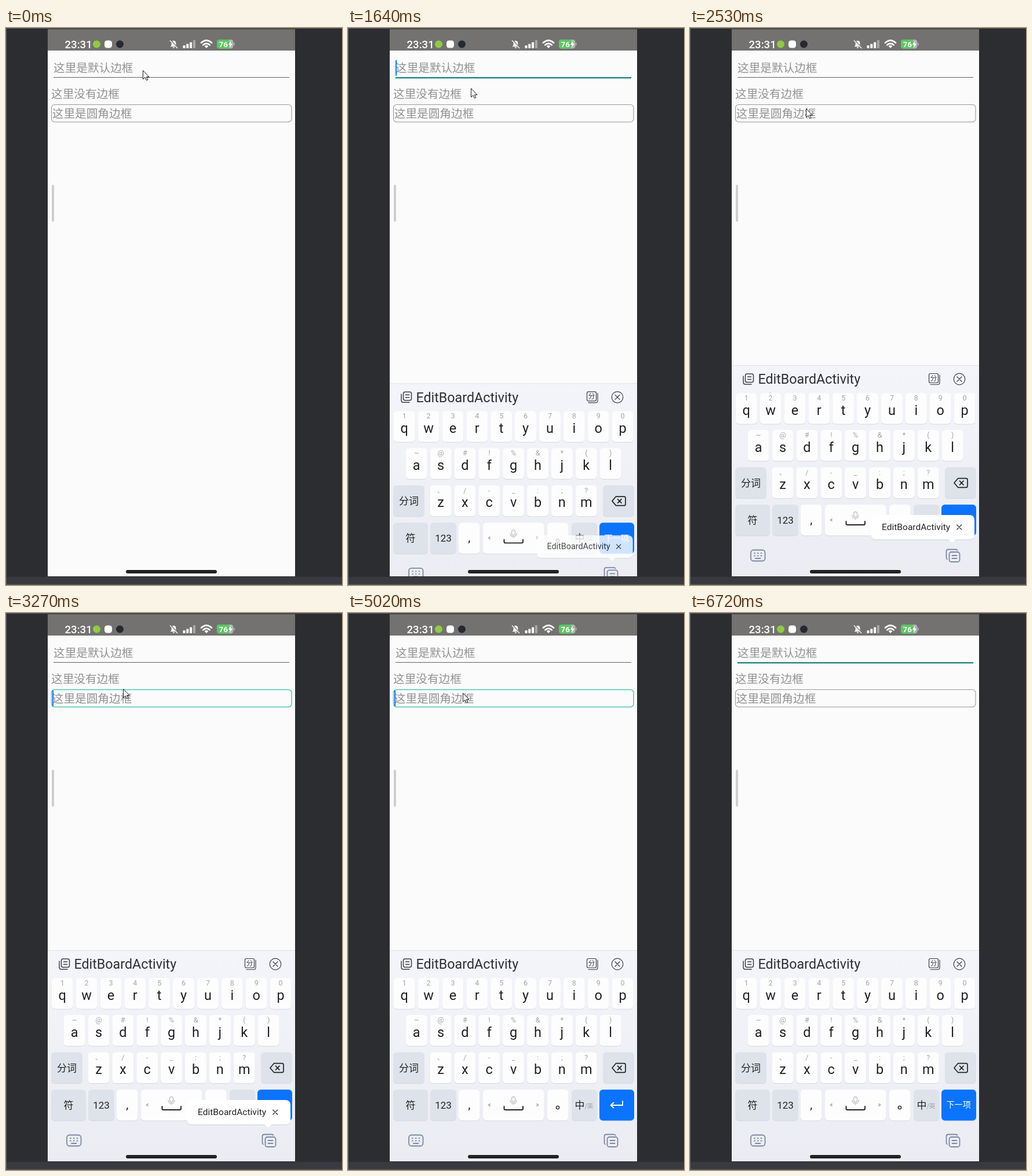
An HTML page for the animation above (6.74 s loop, 580 px wide and 963 px high).

```html
<!DOCTYPE html>
<html lang="zh-CN">
<head>
<meta charset="utf-8">
<title>Edit field borders</title>
<style>
html, body { margin: 0; width: 100%; height: 100%; overflow: hidden; background: #2c2d31; }
svg { display: block; width: 100%; height: 100%; }
text { font-family: Roboto, "Noto Sans CJK SC", "Noto Sans CJK", sans-serif; }
.zh { font-family: "Noto Sans CJK SC", "Noto Sans CJK", "Noto Sans CJK JP", sans-serif; }
.mid { text-anchor: middle; }
.line { fill: none; stroke-linecap: round; stroke-linejoin: round; }
</style>
</head>
<body>
<svg viewBox="0 0 580 963" preserveAspectRatio="none">
  <defs>
    <linearGradient id="board" x1="0" y1="0" x2="0" y2="1">
      <stop offset="0" stop-color="#f3f5fa"/>
      <stop offset="1" stop-color="#eaecf2"/>
    </linearGradient>
    <clipPath id="screen"><rect x="72" y="2" width="427" height="946"/></clipPath>
  </defs>

  <rect width="580" height="963" fill="#2c2d31"/>
  <rect y="949" width="580" height="13" fill="#393a3f"/>
  <rect y="961.5" width="580" height="1.5" fill="#56575a"/>
  <rect width="580" height="1" fill="#606163"/>
  <rect width="1" height="963" fill="#606163"/>

  <g clip-path="url(#screen)">
    <rect x="72" y="2" width="427" height="946" fill="#fbfbfb"/>
    <rect x="72" y="2" width="427" height="37" fill="#737270"/>

    <g fill="#fff">
      <text x="101.5" y="35" font-size="18.6" font-weight="500">23:31</text>
      <circle cx="156.5" cy="28" r="6.5" fill="#8fcb3f"/>
      <rect x="170" y="21.5" width="13" height="13" rx="4.5"/>
      <circle cx="196.5" cy="28" r="6.5" fill="#252a31"/>
      <path d="M283.5 32.2L285.6 30V26.500Q285.600 22.500 289.500 21.800Q293.400 22.500 293.400 26.500V30L295.500 32.200ZM287.700 33.200H291.300Q290.800 35 289.500 35Q288.200 35 287.700 33.200Z"/>
      <path d="M283.500 21L296 34.500" stroke="#737270" stroke-width="2.600"/>
      <path d="M283 21.500L296 35" stroke="#fff" stroke-width="1.300"/>
      <rect x="305.500" y="30" width="4" height="5" rx="1"/>
      <rect x="311.300" y="27.500" width="4" height="7.500" rx="1"/>
      <rect x="317.100" y="24.500" width="4" height="10.500" rx="1"/>
      <rect x="322.900" y="21" width="4" height="14" rx="1" fill="#aaa9a8"/>
      <g class="line" stroke="#fff" stroke-width="2.700" stroke-linecap="butt">
        <path d="M337 25.500Q346 17.200 355 25.500"/>
        <path d="M340.300 29.300Q346 24.200 351.700 29.300"/>
      </g>
      <path d="M342.600 31.300Q346 28.600 349.400 31.300L346 35Z"/>
      <rect x="364" y="20" width="28.500" height="15.500" rx="4.500" fill="#b3b3b1"/>
      <path d="M368.500 20H385V35.500H368.500Q364 35.500 364 31V24.500Q364 20 368.500 20Z" fill="#5cc763"/>
      <rect x="393.200" y="25.500" width="1.500" height="5" rx=".7" fill="#b3b3b1"/>
      <text x="367.500" y="32.700" font-size="13.500" font-weight="700">76</text>
      <path d="M388.500 22L383.800 29H387L386 34L391 27H387.700Z"/>
    </g>

    <g class="zh" font-size="19.650" fill="#929292">
      <text class="zh" x="82" y="76.300">这里是默认边框</text>
      <text class="zh" x="78" y="120.500">这里没有边框</text>
      <text class="zh" x="79.800" y="154.700">这里是圆角边框</text>
    </g>
    <rect id="under" x="82"  width="407"/>
    <rect id="round" x="78.500" y="132.500" width="414.500" height="30" rx="5.500" fill="none"/>
    <rect id="caret" width="2" height="27" fill="#0a78ff"/>
    <rect x="79" y="271" width="4" height="64" rx="2" fill="#cfcfcf"/>

    <g id="keys">
      <rect x="72" y="583" width="427" height="380" fill="url(#board)"/>
      <rect x="72" y="583" width="427" height="1" fill="#dfe1e5"/>
      <g class="line" stroke="#3c3f45" stroke-width="1.500">
        <rect x="95.500" y="598" width="14" height="14.500" rx="3"/>
        <path d="M99.500 603H105.500M99.500 607.500H105.500M92 602V612.500Q92 616 95.500 616H106"/>
        <rect x="412.500" y="597.500" width="16" height="16" rx="2.500" stroke-width="1.200"/>
        <path d="M431 600V613Q431 616.500 427.500 616.500H415" stroke-width="1.200"/>
        <circle cx="465" cy="607" r="9.800" stroke-width="1.200"/>
        <path d="M461 603L469 611M469 603L461 611" stroke-width="1.300"/>
      </g>
      <text class="zh mid" x="420.500" y="609.700" font-size="11.500" fill="#3c3f45">分</text>
      <text x="117.500" y="615.300" font-size="23.250" fill="#2e3035">EditBoardActivity</text>

      <g id="caps"></g>

      <g class="line" stroke="#222" stroke-width="1.700">
        <path d="M462.500 778.700H476.500Q479 778.700 479 781.200V791.800Q479 794.300 476.500 794.300H462.500L456 786.500Z"/>
        <path d="M465.500 783.200L472 789.800M472 783.200L465.500 789.800"/>
        <path d="M269.500 853V857Q269.500 859 271.500 859H300Q302 859 302 857V853" stroke-width="1.900"/>
        <circle cx="362" cy="855" r="2.600" stroke-width="1.300"/>
      </g>
      <g class="line" stroke="#c2c3c6" stroke-width="1.300">
        <rect x="282.500" y="836.500" width="6" height="9" rx="3"/>
        <path d="M280 842.500Q280.500 848 285.500 848Q290.500 848 291 842.500M285.500 848V850"/>
      </g>
      <path d="M245.500 847V854L240.800 850.500ZM325.500 847V854L330.200 850.500Z" fill="#b9babd"/>
      <text class="zh mid" x="400" y="856.700" font-size="17" fill="#222">中</text>
      <text class="zh mid" x="416" y="856" font-size="10.500" fill="#9a9da3">/英</text>
      <text id="next" class="zh mid" x="463.700" y="855.300" font-size="14.200" fill="#fff">下一项</text>
      <path id="enter" class="line" d="M474 844V851H454M458.500 846.500L453.500 851L458.500 855.500" stroke="#fff" stroke-width="1.800"/>

      <g class="line" stroke="#7c88a3" stroke-width="1.800">
        <rect x="105" y="902.500" width="24.500" height="19" rx="4.500"/>
        <path d="M111 908H112M116.700 908H117.700M122.500 908H123.500M111 912.500H112M116.700 912.500H117.700M122.500 912.500H123.500M113 917H121.500"/>
        <rect x="447.500" y="906" width="18" height="17" rx="3.500"/>
        <path d="M452.500 912H460.500M452.500 917H460.500M444 918.500Q442.500 918 442.500 915.500V905Q442.500 901.500 446 901.500H458Q461 901.500 461.500 903"/>
      </g>

      <g id="tip">
        <path d="M321 843.500H482Q491 843.500 491 852.500V877Q491 886 482 886H321Q312 886 312 877V852.500Q312 843.500 321 843.500Z" fill="#a9b0c0" opacity=".22"/>
        <path d="M321 842H482Q491 842 491 851V875Q491 884 482 884H459L452.500 890L446 884H321Q312 884 312 875V851Q312 842 321 842Z" fill="#fff"/>
        <text x="331" y="868.300" font-size="15.550" fill="#242424">EditBoardActivity</text>
        <path class="line" d="M460.700 859L468.700 867M468.700 859L460.700 867" stroke="#333" stroke-width="1.300"/>
      </g>
    </g>
    <rect x="207" y="937" width="157" height="6" rx="3" fill="#222"/>
  </g>
  <path id="mouse" d="M.5 .5V15.500L4 12.300L6.500 17.500L8.800 16.400L6.400 11.500H11Z" fill="#fff" stroke="#1a1a1a" stroke-width="1"/>
</svg>
<script>
const LOOP = 6740;
const $ = id => document.getElementById(id);
const clamp = v => Math.max(0, Math.min(1, v));
const set = (el, attrs) => { for (const k in attrs) el.setAttribute(k, attrs[k]); };
const show = (el, on) => el.setAttribute('visibility', on ? 'visible' : 'hidden');

function add(tag, attrs, text) {
  const el = document.createElementNS('http://www.w3.org/2000/svg', tag);
  set(el, attrs);
  if (text) el.textContent = text;
  $('caps').appendChild(el);
}

function cap(x, y, w, fill) {
  add('rect', { x, y: y + 1, width: w, height: 53.5, rx: 6, fill: '#d5d8e0' });
  add('rect', { x, y, width: w, height: 53.5, rx: 6, fill });
}

function row(letters, hints, x0, y) {
  [...letters].forEach((ch, i) => {
    const x = x0 + i * 41.87;
    cap(x - 18.5, y, 37, '#fdfdfe');
    add('text', { x, y: y + 13, class: 'mid', 'font-size': 12.5, fill: '#a3a4a7' }, hints[i]);
    add('text', { x, y: y + 37.5, class: 'mid', 'font-size': 23.5, fill: '#1f2023' }, ch);
  });
}

function wide(x, y, w, fill, label, size = 17) {
  cap(x, y, w, fill);
  if (label) add('text', { x: x + w / 2, y: y + 33, class: 'mid', 'font-size': size, fill: '#222' }, label);
}

const GREY = '#dee2ea', WHITE = '#fdfdfe';
row('qwertyuiop', '1234567890', 97.2, 631);
row('asdfghjkl', '~@#!%&*()', 118.2, 695);
row('zxcvbnm', '、/-_:;?', 160, 759.5);
wide(78, 759.5, 54, GREY, '分词');
wide(440, 759.5, 54, GREY);
wide(78, 824, 60, GREY, '符');
wide(142, 824, 45, GREY, '123');
wide(191, 824, 36.5, WHITE, ',', 21);
wide(233, 824, 105.5, WHITE);
wide(344, 824, 36.5, WHITE);
wide(386, 824, 44, GREY);
wide(434, 824, 60, '#0a74ff');

const TICKS = [0, 120, 1260, 1380, 1520, 1640, 1770, 1890, 2010, 2140, 2290, 2410, 2530, 2680,
  2840, 2990, 3140, 3270, 3420, 3570, 3700, 3850, 3980, 4120, 4270, 4390, 4510, 4630, 4780,
  4900, 5020, 5170, 5290, 5440, 5560, 5680, 5800, 5950, 6100, 6250, 6400, 6560, 6720];

// taps: time, field
const TAPS = [[1260, 1], [1890, 2], [2990, 3], [3850, 3], [5440, 2], [5950, 1]];
const CARETS = { 1: [82, 55.5], 2: [78, 100], 3: [80, 134] };

// pointer visits: time, x, y
const VISITS = [
  [[0, 236, 73], [1380, 236, 73], [1640, 212, 104], [1770, 206, 113], [2290, 206, 113],
   [2410, 200, 139], [2990, 200, 139], [3270, 202, 131], [4260, 202, 131]],
  [[4780, 200, 140], [5020, 198, 138], [5170, 186, 113], [5440, 186, 113],
   [5680, 184, 73], [5950, 184, 73], [6100, 524, 200]]
];

function pointer(t) {
  const path = VISITS.find(p => t >= p[0][0] && t <= p[p.length - 1][0]);
  if (!path) return null;
  const i = Math.max(1, path.findIndex(p => p[0] >= t));
  const [a, b] = [path[i - 1], path[i]];
  const k = (t - a[0]) / (b[0] - a[0]);
  return [a[1] + (b[1] - a[1]) * k, a[2] + (b[2] - a[2]) * k];
}

function render(now) {
  const t = TICKS.filter(v => v <= now).pop();
  const [since, field] = TAPS.filter(p => p[0] <= t).pop() || [0, 0];

  set($('under'), field === 1
    ? { y: 85, height: 2.2, fill: '#12807f' }
    : { y: 84.9, height: 1.1, fill: '#6c6c6c' });
  set($('round'), field === 3
    ? { stroke: '#4fc8ab', 'stroke-width': 1.5 }
    : { stroke: '#999', 'stroke-width': 1.1 });

  show($('caret'), field && (t - since) % 1000 < 500);
  if (field) set($('caret'), { x: CARETS[field][0], y: CARETS[field][1] });
  show($('next'), field !== 3);
  show($('enter'), field === 3);

  const rise = clamp((t - 1400) / 480);
  const drop = 380 * Math.pow(1 - rise, 3.6);
  show($('keys'), rise > 0);
  set($('keys'), { transform: `translate(0 ${drop.toFixed(2)})` });

  const q = Math.min(clamp((t - 1500) / 173), clamp(1 - (t - 4290) / 270));
  const s = 0.61 + 0.39 * q;
  set($('tip'), { opacity: q, transform: `translate(498 893) scale(${s}) translate(-498 -893)` });

  const at = pointer(t);
  show($('mouse'), at);
  if (at) set($('mouse'), { transform: `translate(${Math.round(at[0])} ${Math.round(at[1])})` });
}

const start = performance.now();
function loop() {
  render((performance.now() - start) % LOOP);
  requestAnimationFrame(loop);
}
loop();
</script>
</body>
</html>
```
